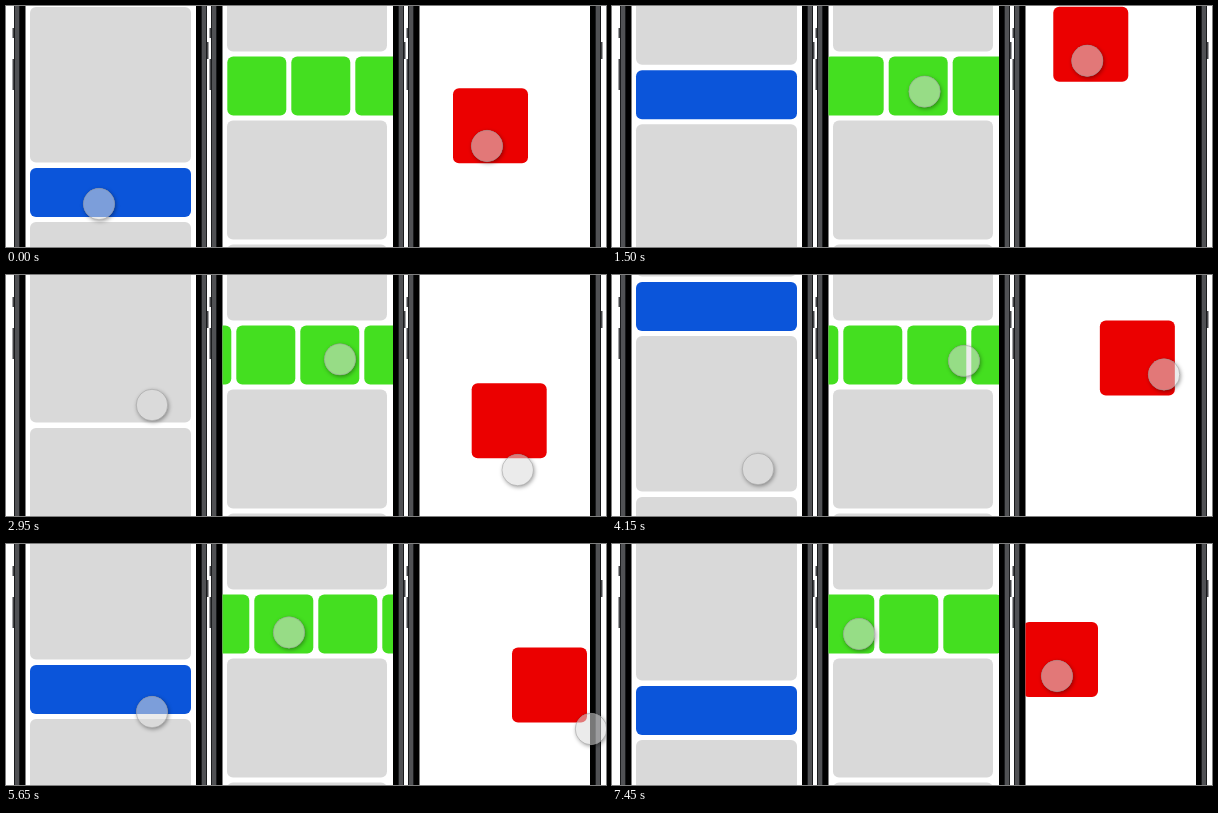
An HTML page with a canvas that plays this animation: 600 by 241 pixels, repeating every 7.5 s.

```html
<!DOCTYPE html>
<html lang="en">
<head>
<meta charset="utf-8">
<title>Touch gestures</title>
<style>
html, body { margin: 0; width: 100%; height: 100%; overflow: hidden; background: #fff; }
canvas { display: block; }
</style>
</head>
<body>
<canvas id="stage" width="600" height="241"></canvas>
<script>
const ctx = document.getElementById('stage').getContext('2d');
const W = 600, H = 241, LOOP = 7500, STEP = 50, FADE = 120;
const GRAY = '#d9d9d9', BLUE = '#0b55da', GREEN = '#44df20', RED = '#eb0000';
const PITCH = 161, TILE = 64;

// Eases from one [time, value] point to the next, at rest on each
function swing(t, ...points) {
  if (t <= points[0][0]) return points[0][1];
  for (let i = 1; i < points.length; i++) {
    const [t0, a] = points[i - 1], [t1, b] = points[i];
    if (t < t1) return a + (b - a) * (1 - Math.cos(Math.PI * (t - t0) / (t1 - t0))) / 2;
  }
  return points.at(-1)[1];
}

// Opacity of a finger that is down during the given spans
function shown(t, ...spans) {
  const level = ([from, to]) => Math.min((t - from) / FADE, (to - t) / FADE, 1);
  return Math.max(0, ...spans.map(level));
}

// Past the limit the box follows the finger only partly
const resist = (v, limit, k) => v < limit ? v : limit + (v - limit) * k;

function rect(x, y, w, h, color) {
  ctx.fillStyle = color;
  ctx.fillRect(x, y, w, h);
}

function card(x, y, w, h, color) {
  ctx.fillStyle = color;
  ctx.beginPath();
  ctx.roundRect(x, y, w, h, 6);
  ctx.fill();
}

function phone(x, content) {
  rect(x, 0, 193, H, '#1a1b1d');
  rect(x + 1, 0, 4, H, '#505154');
  rect(x + 188, 0, 4, H, '#505154');
  rect(x + 6, 0, 181, H, '#000');
  rect(x - 1.5, 22, 1.5, 10, '#444548');
  rect(x - 1.5, 53, 1.5, 31, '#444548');
  rect(x + 193, 36, 1.5, 17, '#444548');
  ctx.save();
  ctx.beginPath();
  ctx.rect(x + 11.5, 0, 170.5, H);
  ctx.clip();
  rect(x + 11, 0, 172, H, '#fff');
  content();
  ctx.restore();
}

function touch(x, y, alpha = 1) {
  if (!alpha) return;
  const disc = () => ctx.arc(x, y, 15.7, 0, Math.PI * 2);
  ctx.save();
  ctx.globalAlpha = alpha;

  // Soft shadow, only outside the disc
  ctx.save();
  ctx.beginPath();
  ctx.rect(0, 0, W, H);
  disc();
  ctx.clip('evenodd');
  ctx.shadowColor = 'rgba(0,0,0,.4)';
  ctx.shadowBlur = 4;
  ctx.shadowOffsetX = 1;
  ctx.shadowOffsetY = 1.5;
  ctx.fillStyle = '#aaa';
  ctx.beginPath();
  disc();
  ctx.fill();
  ctx.restore();

  ctx.beginPath();
  disc();
  ctx.fillStyle = 'rgba(218,218,218,.55)';
  ctx.fill();
  ctx.strokeStyle = 'rgba(150,150,150,.55)';
  ctx.lineWidth = 0.8;
  ctx.stroke();
  ctx.restore();
}

function drawList(t) {
  const y = swing(t, [790, 162], [2150, -21], [2950, -62], [4150, 7], [5650, 121], [6300, 142]);
  for (let i = -2; i < 3; i++) card(24, y + i * PITCH + (i < 0 ? 0 : 54), 161, 155.5, GRAY);
  card(24, y, 161, 49, BLUE);
}

function drawRow(t) {
  card(221, -60, 160, 105.5, GRAY);
  card(221, 114.5, 160, 119, GRAY);
  card(221, 238.5, 160, 60, GRAY);
  const dx = swing(t, [1200, 0], [2150, -38], [2950, -119], [4150, -182], [5650, -229], [7450, -338]);
  for (let i = 0; i < 10; i++) card(221.3 + i * TILE + dx, 50.5, 59, 59, GREEN);
}

function drawBox(x, y) {
  card(resist(x, 485, 0.55) - 34, resist(y, 133, 0.47) - 54, 75, 75, RED);
}

function draw(t) {
  const boxX = swing(t, [0, 481], [900, 487], [2150, 462], [3650, 552], [4150, 552], [5650, 585], [7450, 445]);
  const boxY = swing(t, [0, 140], [300, 208], [1150, 8], [2200, 195], [2950, 195],
    [4900, 54], [5650, 185], [6200, 84], [7000, 180], [7450, 132]);

  rect(0, 0, W, H, '#fff');
  phone(8, () => drawList(t));
  phone(205, () => drawRow(t));
  phone(402, () => drawBox(boxX, boxY));

  touch(
    swing(t, [0, 93], [300, 42], [900, 140], [1150, 146], [6300, 146], [6950, 48]),
    swing(t, [0, 198], [900, 196], [1500, 80], [2150, 196], [2950, 130], [4150, 194], [4900, 120], [5650, 168], [6300, 182]),
    shown(t, [-FADE, 1500], [2000, 4400], [5100, 7000])
  );
  touch(
    swing(t, [900, 328], [2150, 295], [2950, 334], [4150, 352], [5650, 283], [7450, 247]),
    swing(t, [900, 87], [2150, 84], [7450, 90]),
    shown(t, [760, 2300], [2800, 3100], [4000, LOOP + FADE])
  );
  touch(boxX, boxY);
}

const start = performance.now();
function frame() {
  const t = (performance.now() - start) % LOOP;
  draw(Math.floor(t / STEP) * STEP);
  requestAnimationFrame(frame);
}
frame();
</script>
</body>
</html>
```
